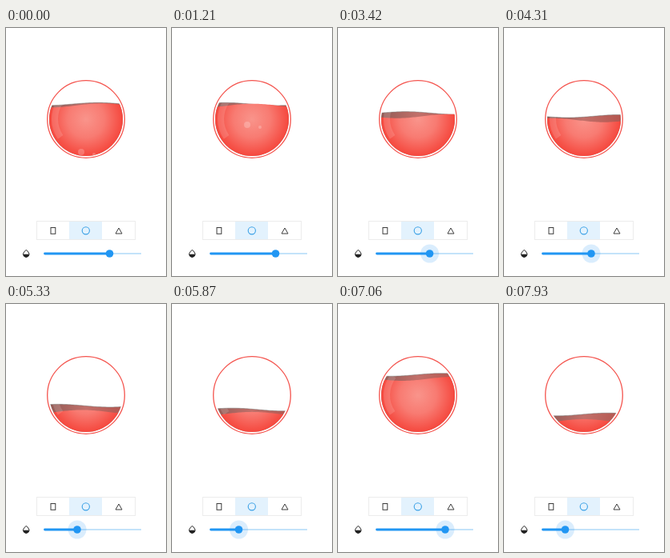
These frames come from a looping animation (200x310 px, 8000 ms). An HTML page with a canvas:

```html
<!DOCTYPE html>
<html>
<head>
<meta charset="utf-8">
<style>
html, body { margin: 0; width: 100%; height: 100%; overflow: hidden; background: #fff; }
canvas { display: block; width: 200px; height: 310px; }
</style>
</head>
<body>
<canvas id="stage"></canvas>
<script>
const LOOP = 8000, CX = 100, CY = 114, R = 46, TAU = Math.PI * 2;
const BLUE = '#2196f3', RED = '#f4544e', INK = '#3c3c3c';

// time, thumb x, front crest, front drop, back crest, back drop
const KEYS = [
  [0, 129.5, 120, 1.7, 115, 0],
  [1780, 129.5, 283, 2.2, 234, 0],
  [2400, 121, 340, 2.5, 275, 0],
  [4310, 109, 450, 3.5, 405, -1.5],
  [5330, 89, 485, 7, 455, -0.8],
  [5870, 83.5, 490, 5, 465, -0.4],
  [6650, 141, 520, 3, 501, -1.5],
  [7060, 134, 535, 2, 520, -3],
  [7930, 76.5, 620, 8.5, 650, 0],
  [8000, 76, 625, 8.5, 656, 0]
];
// x, y at start, start time, radius
const BUBBLES = [[94, 155, 0, 4], [110, 158, 0, 2], [110, 160, 1400, 4]];

const canvas = document.getElementById('stage');
const c = canvas.getContext('2d');
const scale = window.devicePixelRatio || 1;
canvas.width = 200 * scale;
canvas.height = 310 * scale;

function pose(t) {
  let i = 1;
  while (i < KEYS.length - 1 && t > KEYS[i][0]) i++;
  const a = KEYS[i - 1], b = KEYS[i];
  const u = (t - a[0]) / (b[0] - a[0]);
  return a.map((v, n) => v + (b[n] - v) * u);
}

function fill(style) { c.fillStyle = style; c.fill(); }
function stroke(style, width) { c.strokeStyle = style; c.lineWidth = width; c.stroke(); }
function disc(x, y, r) { c.beginPath(); c.arc(x, y, r, 0, TAU); }
function line(x1, y1, x2, y2, style, width) {
  c.beginPath(); c.moveTo(x1, y1); c.lineTo(x2, y2); stroke(style, width);
}

function wave(level, crest, height) {
  c.beginPath();
  for (let x = 52; x <= 148; x += 2) c.lineTo(x, level - height * Math.cos((x - crest) / 130 * TAU));
  c.lineTo(148, 162);
  c.lineTo(52, 162);
  c.closePath();
}

function liquid(t, [, thumb, frontCrest, frontDrop, backCrest, backDrop]) {
  const level = 200 - 0.81 * thumb;
  c.save();
  disc(CX, CY, R);
  c.clip();

  const dark = c.createLinearGradient(54, 0, 146, 0);
  dark.addColorStop(0, '#925b56');
  dark.addColorStop(0.5, '#c2706a');
  dark.addColorStop(1, '#b4564f');
  wave(level + backDrop, backCrest, 1.8);
  fill(dark);
  stroke('rgba(100,110,108,.45)', 1);

  const light = c.createRadialGradient(CX, CY, 0, CX, CY, R);
  light.addColorStop(0, '#f9948b');
  light.addColorStop(0.5, '#f87b72');
  light.addColorStop(1, '#f5483e');
  wave(level + frontDrop, frontCrest, 2.5);
  fill(light);

  for (const [x, y, start, r] of BUBBLES) {
    const by = y - (t - start) * 0.028;
    const alpha = Math.min(0.22, (by - level - 10) / 40);
    if (t < start || alpha <= 0) continue;
    disc(x, by, r);
    fill(`rgba(255,255,255,${alpha})`);
  }

  // glass highlight, only where there is liquid
  wave(level + backDrop, backCrest, 1.8);
  c.clip();
  c.beginPath();
  c.arc(CX, CY, 39, 2.53, 3.8);
  stroke('rgba(255,255,255,.14)', 8);
  c.restore();

  disc(CX, CY, 48.3);
  stroke(RED, 1.3);
}

function tabs() {
  c.fillStyle = '#e3f2fd';
  c.fillRect(79, 241, 41, 24);
  c.lineWidth = 1;
  c.strokeStyle = '#ececec';
  c.strokeRect(38.5, 241.5, 123, 23);
  c.strokeStyle = INK;
  c.strokeRect(56, 249.5, 5.8, 7.8);
  disc(99.8, 253.3, 4.6);
  stroke('#3ba1e6', 1.1);
  c.beginPath();
  c.moveTo(141, 250);
  c.lineTo(145, 257);
  c.lineTo(137, 257);
  c.closePath();
  stroke(INK, 1);
}

function drop() {
  c.beginPath();
  c.moveTo(25.2, 277.3);
  c.lineTo(27.9, 280.1);
  c.arc(25.2, 282.7, 3.7, -0.76, Math.PI + 0.76);
  c.closePath();
  stroke('#222', 1);
  c.beginPath();
  c.arc(25.2, 282.7, 3.7, 0, Math.PI);
  fill('#222');
}

function slider(x, pressed) {
  line(48, 282, 169, 282, '#c3e3fa', 2);
  if (pressed) {
    disc(x, 282, 11.5);
    fill('rgba(33,150,243,.17)');
  }
  c.lineCap = 'round';
  line(48.5, 282, x, 282, BLUE, 2.8);
  c.lineCap = 'butt';
  disc(x, 282, 4.8);
  fill(BLUE);
}

function draw(now) {
  const t = now % LOOP, p = pose(t);
  c.setTransform(scale, 0, 0, scale, 0, 0);
  c.fillStyle = '#fff';
  c.fillRect(0, 0, 200, 310);
  liquid(t, p);
  tabs();
  drop();
  slider(p[1], t >= 1830);
}

let begin;
function frame(now) {
  begin ??= now;
  draw(now - begin);
  requestAnimationFrame(frame);
}
draw(0);
requestAnimationFrame(frame);
</script>
</body>
</html>
```
